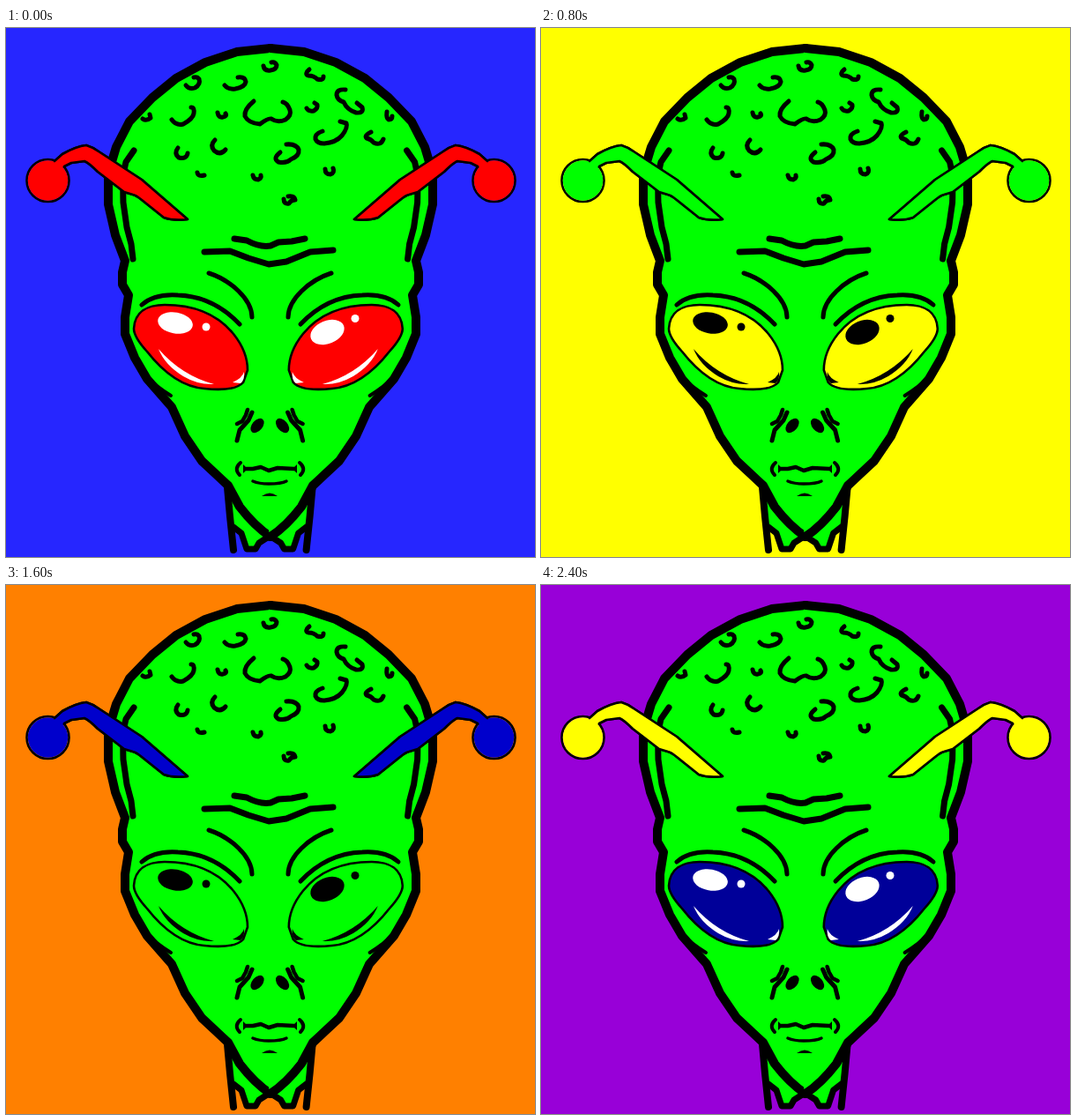
Animation of 600x600 px, one loop 2800 ms. Source, as an HTML page:

```html
<!DOCTYPE html>
<html lang="en">
<head>
<meta charset="utf-8">
<title>Alien colours</title>
<style>
  html, body { margin: 0; width: 100%; height: 100%; overflow: hidden; }
  svg { display: block; width: 100vw; height: 100vh; background: var(--bg); }
  .line { fill: none; stroke: #000; stroke-linecap: round; stroke-linejoin: round; }
  .skin { fill: #0f0; }
  .feeler { fill: var(--feeler); }
  .eye { fill: var(--eye); stroke: #000; stroke-width: 2.6; }
  .shine { fill: var(--shine); }
</style>
</head>
<body>
<svg id="stage" viewBox="0 0 600 600"></svg>
<script>
const STEP = 400;
const themes = [
  { bg: '#2626ff', feeler: '#f00', eye: '#f00', shine: '#fff' },
  { bg: '#0f0', feeler: '#0f0', eye: '#0f0', shine: '#000' },
  { bg: '#ff0', feeler: '#0f0', eye: '#ff0', shine: '#000' },
  { bg: '#e60000', feeler: '#00f', eye: '#00f', shine: '#fff' },
  { bg: '#ff8000', feeler: '#00c', eye: '#0f0', shine: '#000' },
  { bg: '#1f0033', feeler: '#0f0', eye: '#f00', shine: '#e8ffe8' },
  { bg: '#9800d8', feeler: '#ff0', eye: '#000099', shine: '#fff' }
];

const stage = document.getElementById('stage');
const line = (d, w) => `<path class="line" stroke-width="${w}" d="${d}"/>`;
const fill = (d, cls = '') => `<path class="${cls}" d="${d}"/>`;
const oval = (x, y, rx, ry, turn, cls = '') =>
  `<ellipse class="${cls}" cx="${x}" cy="${y}" rx="${rx}" ry="${ry}" transform="rotate(${turn} ${x} ${y})"/>`;
// Repeats a left-hand part on the right of a vertical axis.
const both = (part, axis = 300) =>
  part + `<g transform="translate(${2 * axis} 0) scale(-1 1)">${part}</g>`;

const side = 'M300 23L262 27 226 39 193 57 166 79 140 106 125 135 116 165 116 200 124 235 135 264 ' +
  '132 277 132 291 139 303 135 328 135 347 146 374 160 398 188 430 203 463 222 491 252 519 265 543 ' +
  'Q282 565 300 577';
const neck = 'M252 519L258 563 267 573 273 591 283 591 287 584 300 577 265 543Z';

// The fill runs past the axis so that the halves leave no seam.
const head = both(fill(neck, 'skin'), 299.3) +
  both(fill(side + 'H302V23Z', 'skin') + line(side, 10)) +
  both(
    line('M251 521L254 554 258 592', 8) +
    line('M258 566L267 573 273 591 283 591 287 584 301 575', 7),
    299.3
  ) +
  both(
    line('M145 139L136 152Q132 166 133 198L137 226 142 245 144 262', 7) +
    line('M155 392Q172 408 187 417', 4),
    299.8
  );

const bumps = [
  'M204 65Q208 70 214 68Q221 64 219 58Q217 55 213 56',
  'M248 65Q252 70 260 69Q271 67 272 61Q271 55 263 56',
  'M292 43Q293 49 300 48Q307 47 307 42Q305 38 301 39',
  'M344 47Q338 52 343 54Q349 54 353 58Q360 60 360 55',
  'M385 70Q375 69 375 76Q376 82 383 84Q387 93 397 96Q406 97 404 90L398 85',
  'M281 83Q270 92 271 100Q275 108 288 109Q297 102 301 103Q308 108 317 104Q324 99 322 93Q319 85 314 84',
  'M188 104Q193 111 201 109Q212 103 213 97Q214 90 210 90',
  'M240 96Q241 102 246 101Q251 100 249 97',
  'M341 91Q343 95 349 94Q354 91 353 87L350 85',
  'M432 95Q431 102 434 104Q438 104 438 100',
  'M359 117Q350 120 351 126Q353 131 361 131Q374 130 381 122Q388 113 386 108L379 106',
  'M414 118Q406 122 409 125Q414 126 417 130Q425 134 428 126',
  'M155 103Q159 106 164 102L163 98',
  'M195 136Q190 142 196 147Q205 149 206 142',
  'M237 127Q231 133 236 139Q243 145 249 138',
  'M311 141Q302 148 309 152Q318 154 323 149Q333 145 332 138Q329 131 318 132',
  'M217 164Q218 169 225 167',
  'M280 167Q281 172 286 172Q290 170 289 167',
  'M362 160Q362 166 368 166Q373 164 371 159',
  'M315 194Q315 200 321 199Q323 195 328 195Q327 190 320 191'
].map(d => line(d, 5)).join('');

const brows = line('M259 239L273 241Q288 249 300 247L309 243 324 242 339 239', 7) +
  line('M225 254L254 253 275 261 298 268 318 265 345 254 371 252', 7) +
  both(
    line('M154 314C165 304 180 302 195 303C225 304 247 317 265 336', 5) +
    line('M230 278C255 286 279 308 279 328', 5),
    299.5
  );

const eyes = both(
    fill('M145 341C146 322 160 314 180 314C215 314 241 326 258 347C270 362 274 375 274 388L269 402' +
      'C262 410 245 411 225 409C200 407 178 390 160 367C150 356 145 348 145 341Z', 'eye') +
    fill('M173 364Q180 382 201 395Q218 405 236 404Q199 394 173 364Z', 'shine') +
    fill('M257 402Q268 397 270 390Q271 399 266 403Z', 'shine'),
    297.4
  ) +
  oval(192, 334.5, 20, 12, 10, 'shine') + oval(227, 339, 4.5, 4.5, 0, 'shine') +
  oval(364.5, 345, 20, 13, -22, 'shine') + oval(396, 329.5, 4.5, 4.5, 0, 'shine');

const nose = both(
  oval(285, 451, 6, 9.5, 40) +
  line('M262 468L265 456 275 445 279 436', 5) +
  line('M262 449L268 446 272 439 274 433', 4.5),
  299.3
);

const mouth = line('M272 500L280 500 289 498 298 502 308 499 327 500', 4.5) +
  both(line('M266 493Q258 500 265 507', 4) + fill('M269 495L274 500 269 505Z'), 299.5) +
  line('M280 514Q287 517 298 517Q312 517 318 514', 3.5) +
  fill('M290 531Q299 524 308 531Z');

const ball = '<circle cx="47.5" cy="173" r="24"/>';
const stem = '<path d="M55 151L64 143Q80 134 91 133Q98 135 105 140L154 172 206 217Q190 219 179 215' +
  'L154 195Q148 190 144 189L134 186 104 163Q94 153 89 151L74 153 66 157L58 160Z"/>';
const feelers = both(
  `<g class="line feeler" stroke-width="5">${ball + stem}</g>` .replace(' feeler', '') +
  `<g class="feeler">${ball + stem}</g>`,
  300.5
).replaceAll('stroke-width="5"', 'stroke-width="2.6"');
const outlined = both(
  `<g class="line" stroke-width="2.6">${ball + stem}</g>` +
  `<g class="feeler">${ball.replace('r="24"', 'r="22.7"') + stem}</g>` +
  line('M64 143Q80 134 91 133Q98 135 105 140L154 172 206 217Q190 219 179 215' +
    'L154 195Q148 190 144 189L134 186 104 163Q94 153 89 151L74 153 66 157M64 143L55 151', 2.6),
  300.5
);

stage.innerHTML = head + bumps + brows + eyes + nose + mouth + outlined;

let shown = -1;
function draw(time) {
  const index = Math.floor(time / STEP) % themes.length;
  if (index === shown) return;
  shown = index;
  for (const [name, colour] of Object.entries(themes[index])) {
    stage.style.setProperty('--' + name, colour);
  }
}

const start = performance.now();
function tick() {
  draw(performance.now() - start);
  requestAnimationFrame(tick);
}
tick();
</script>
</body>
</html>
```
